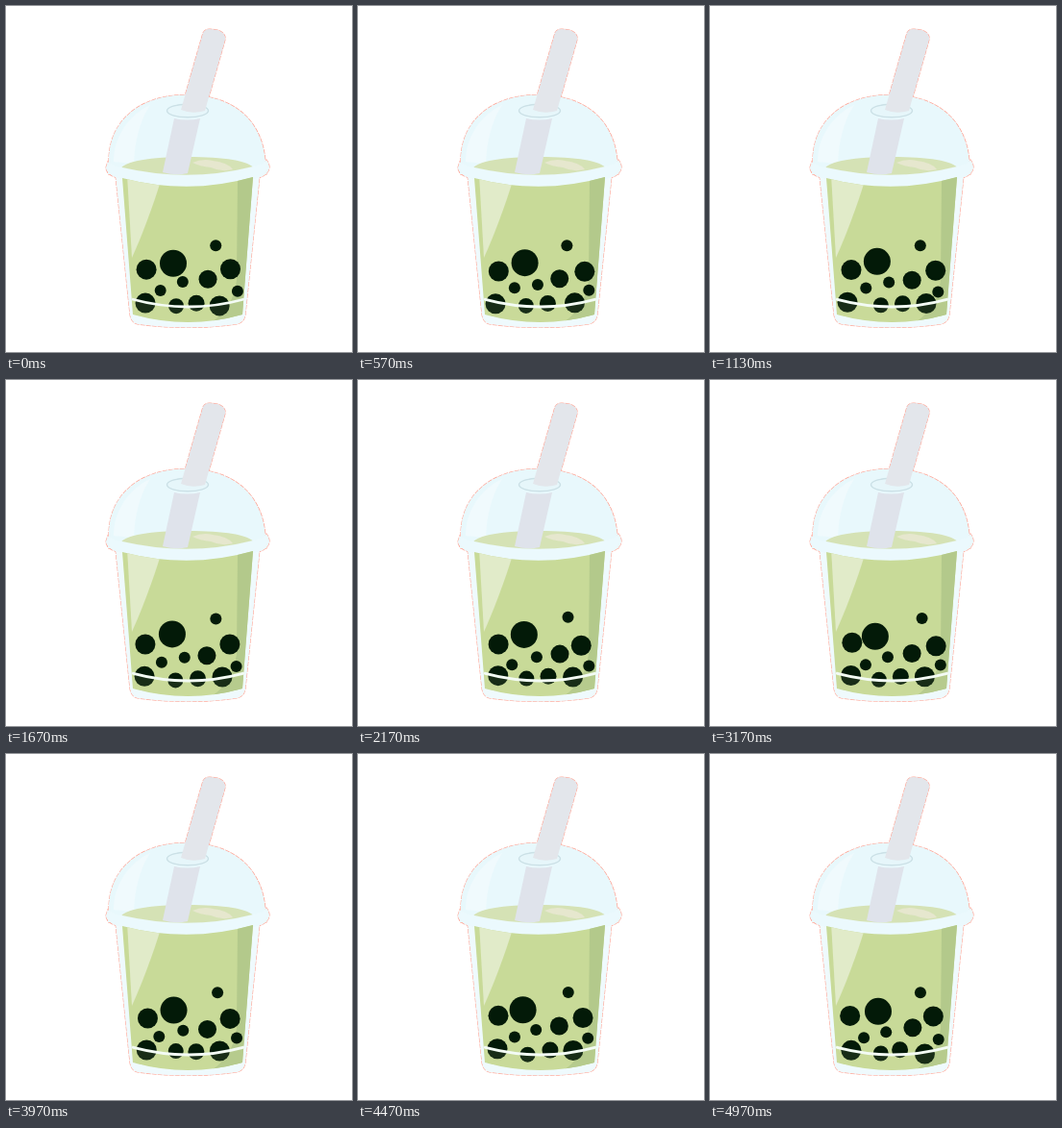
Recreate the animation shown at these times as an HTML page. Size 360 by 360 pixels, loop 5000 ms.

```html
<!DOCTYPE html>
<html lang="en">
<head>
<meta charset="utf-8">
<title>Bubble tea</title>
<style>
  html, body { margin: 0; width: 100%; height: 100%; overflow: hidden; background: #fff; }
  svg { display: block; width: 100%; height: 100%; }
</style>
</head>
<body>
<svg viewBox="0 0 360 360">
  <defs>
    <path id="dome" d="M107 163C106 120 139 92.500 187 92.500C237 92.500 267 119 270 163L271 175L106 175Z"/>
    <path id="cup" d="M114 176L129 321Q130 329 137 331Q190 338 240 331Q248 329 249 321L264 176Z"/>
    <path id="rim" d="M106 162Q109 166 121 168Q190 184 257 167Q268 165 271 160Q274 164 274 168Q273 176 262 179Q190 197 116 179Q104 175 104 168Z"/>
    <path id="straw" d="M205 28Q207 24 212 24L220 25Q229 28 228 35L207 109Q194 113 182 108Z"/>
    <clipPath id="tea"><path d="M121 179Q190 197 257 178L246 321Q190 337 132 321Z"/></clipPath>
  </defs>

  <!-- fine warm edge around the silhouette -->
  <g fill="none" stroke="#ffa596" stroke-width="1.2" stroke-dasharray="5 1">
    <use href="#dome"/><use href="#cup"/><use href="#rim"/><use href="#straw"/>
  </g>

  <use href="#cup" fill="#effafd"/>
  <use href="#dome" fill="#e8f8fc"/>
  <path d="M112 162C112 136 128 113 150 103C139 120 134 140 133 164Z" fill="#f0fafd"/>
  <path d="M119 170C123 161 151 157 189 157C227 157 253 161 258 169Q190 187 119 170Z" fill="#d5e2b5"/>
  <path d="M194 163Q205 158 215 161Q231 163 236 170Q224 173 213 168Q202 167 194 163Z" fill="#e6e7ce"/>

  <ellipse cx="189" cy="109" rx="21.5" ry="6.8" fill="#e6f6fa" stroke="#cbe0e6" stroke-width="1.4"/>
  <path d="M175 117Q188 120 202 117L189 174Q176 177 163 173Z" fill="#dfe3eb"/>
  <use href="#straw" fill="#e3e6eb"/>
  <use href="#rim" fill="#ebf9fd"/>

  <g clip-path="url(#tea)">
    <rect x="115" y="170" width="150" height="165" fill="#c8da98"/>
    <path d="M126 175L161 182C153 208 141 240 131 262Z" fill="#e1ebc9"/>
    <path d="M241 175H260L248 335H203Q236 320 240 285Z" fill="#b3c98b"/>
    <g id="pearls" fill="#031a08"/>
    <path d="M130 305Q190 321 249 305V340H130Z" fill="#c8da98" opacity=".1"/>
  </g>
  <path d="M131 305Q190 321 248 305" fill="none" stroke="#f3fbf4" stroke-width="2.8"/>
</svg>
<script>
const LOOP = 5000, FPS = 30, BEAT = 500, REACH = 2.2;
const layer = document.getElementById("pearls");

const pearls = [
  [219, 248, 6], [173, 266, 14], [146, 274, 10.5], [234, 275, 10.5],
  [185, 289, 6], [209, 285, 9.5], [161, 295, 6], [239, 297, 6],
  [145, 308, 10.5], [176, 311, 8], [199, 310, 8.5], [224, 310, 10.5]
].map(([x, y, radius]) => {
  const node = document.createElementNS("http://www.w3.org/2000/svg", "circle");
  node.setAttribute("r", radius);
  layer.append(node);
  return { node, x, y };
});

// Repeatable pseudo-random number in -1..1
function random(seed, step) {
  const n = Math.sin(seed * 127.1 + step * 311.7) * 43758.5453;
  return (n - Math.floor(n)) * 2 - 1;
}

// Smooth drift between random offsets, one per beat
function drift(seed, time) {
  const step = Math.floor(time / BEAT);
  const u = time / BEAT - step;
  const from = random(seed, step), to = random(seed, step + 1);
  return REACH * (from + (to - from) * u * u * (3 - 2 * u));
}

function draw(ms) {
  const time = Math.floor((ms % LOOP) * FPS / 1000 + 0.1) * 1000 / FPS;
  pearls.forEach(({ node, x, y }, i) => {
    node.setAttribute("cx", x + drift(2 * i + 1, time));
    node.setAttribute("cy", y + drift(2 * i + 2, time));
  });
}

const start = performance.now();
function tick() {
  draw(performance.now() - start);
  requestAnimationFrame(tick);
}
tick();
</script>
</body>
</html>
```
